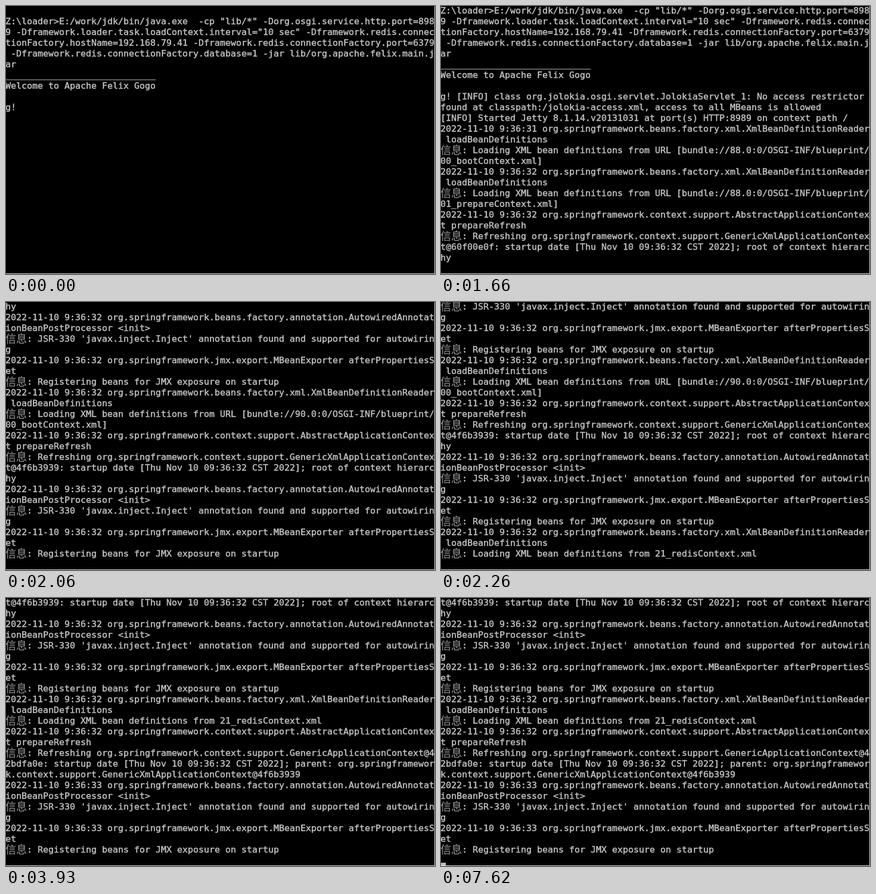
Animation, 800 px wide and 499 px high, one loop 8000 ms. Source, as an HTML page with a canvas:

```html
<!DOCTYPE html>
<html lang="en">
<head>
<meta charset="utf-8">
<title>Console</title>
<style>
html, body { margin: 0; width: 100%; height: 100%; overflow: hidden; background: #000; }
canvas { display: block; }
</style>
</head>
<body>
<canvas id="stage" width="800" height="499"></canvas>
<script>
const ctx = document.getElementById('stage').getContext('2d');
const LOOP = 8000, COLS = 80, ROWS = 24, CW = 10, RH = 20;
const MONO = '16.61px "DejaVu Sans Mono", monospace';
const CJK = '100 20px "Noto Sans CJK SC", "Noto Sans CJK", sans-serif';
const INK = '#c0c0c0', THIN_INK = '#989898', EDGE = '#f0f0f0';
const INFO = '信息';

const isWide = ch => ch > '\u2e80';

// Break a paragraph at the console width; wide characters take two columns.
function wrap(text) {
  const out = [];
  let line = '', col = 0;
  for (const ch of text) {
    const w = isWide(ch) ? 2 : 1;
    if (col + w > COLS) {
      out.push(line);
      line = '';
      col = 0;
    }
    line += ch;
    col += w;
  }
  return [...out, line];
}

const SPRING = 'org.springframework.';
const DATE = 'startup date [Thu Nov 10 09:36:32 CST 2022]; ';
const entry = (sec, method, msg) =>
  [`2022-11-10 9:36:${sec} ${SPRING}${method}`, `${INFO}: ${msg}`];

const load = (sec, from) => entry(sec,
  'beans.factory.xml.XmlBeanDefinitionReader loadBeanDefinitions',
  'Loading XML bean definitions from ' + from);
const url = (bundle, file) => `URL [bundle://${bundle}.0:0/OSGI-INF/blueprint/${file}.xml]`;
const refresh = (type, id, tail) => entry(32,
  'context.support.AbstractApplicationContext prepareRefresh',
  `Refreshing ${SPRING}context.support.${type}@${id}: ${DATE}${tail}`);
const wire = sec => [
  ...entry(sec, 'beans.factory.annotation.AutowiredAnnotationBeanPostProcessor <init>',
    "JSR-330 'javax.inject.Inject' annotation found and supported for autowiring"),
  ...entry(sec, 'jmx.export.MBeanExporter afterPropertiesSet',
    'Registering beans for JMX exposure on startup')
];
const ROOT = 'root of context hierarchy', XML = 'GenericXmlApplicationContext';

const log = [
  '',
  'Z:\\loader>E:/work/jdk/bin/java.exe  -cp "lib/*" -Dorg.osgi.service.http.port=8989 ' +
  '-Dframework.loader.task.loadContext.interval="10 sec" ' +
  '-Dframework.redis.connectionFactory.hostName=192.168.79.41 ' +
  '-Dframework.redis.connectionFactory.port=6379 ' +
  '-Dframework.redis.connectionFactory.database=1 -jar lib/org.apache.felix.main.jar',
  '_'.repeat(28),
  'Welcome to Apache Felix Gogo',
  '',
  'g! [INFO] class org.jolokia.osgi.servlet.JolokiaServlet_1: No access restrictor ' +
  'found at classpath:/jolokia-access.xml, access to all MBeans is allowed',
  '[INFO] Started Jetty 8.1.14.v20131031 at port(s) HTTP:8989 on context path /',
  ...load(31, url(88, '00_bootContext')),
  ...load(32, url(88, '01_prepareContext')),
  ...refresh(XML, '60f00e0f', ROOT),
  ...wire(32),
  ...load(32, url(90, '00_bootContext')),
  ...refresh(XML, '4f6b3939', ROOT),
  ...wire(32),
  ...load(32, '21_redisContext.xml'),
  ...refresh('GenericApplicationContext', '42bdfa0e',
    `parent: ${SPRING}context.support.${XML}@4f6b3939`),
  ...wire(33)
].flatMap(wrap);

// [time, number of console lines printed so far]
const PRINTED = [[0, 10], [380, 11], [580, 12], [1460, 16], [1660, 25],
  [1860, 32], [2060, 48], [2260, 51], [2460, 63]];
// [cursor on, cursor off]
const BLINKS = [[1260, 1460], [3360, 3930], [4450, 4970], [5500, 6030],
  [6550, 7100], [7620, LOOP]];

function drawLine(text, row) {
  const y = row * RH + 14;
  let x = -1;
  if (text.startsWith(INFO)) {
    ctx.font = CJK;
    ctx.fillStyle = THIN_INK;
    ctx.fillText(INFO, x, y + 2);
    text = text.slice(INFO.length);
    x += 4 * CW;
  }
  // A fine outline gives the Latin text its semi-bold weight.
  ctx.font = MONO;
  ctx.fillStyle = ctx.strokeStyle = INK;
  ctx.lineWidth = 0.5;
  ctx.fillText(text, x, y);
  ctx.strokeText(text, x, y);
}

function draw(t) {
  const count = PRINTED.filter(p => p[0] <= t).pop()[1];
  const top = Math.max(0, count - ROWS);

  ctx.fillStyle = '#000';
  ctx.fillRect(0, 0, 800, 499);
  for (let i = top; i < count; i++) {
    const prompt = count === 10 && i === 9;
    drawLine(prompt ? 'g!' : log[i], i - top);
  }
  if (BLINKS.some(([on, off]) => t >= on && t < off)) {
    ctx.fillStyle = INK;
    ctx.fillRect(0, (count - top) * RH + 13, 9, 5);
  }

  ctx.fillStyle = EDGE;
  ctx.fillRect(799, 0, 1, 499);
  ctx.fillRect(0, 498, 800, 1);
}

const start = performance.now();
function tick() {
  draw((performance.now() - start) % LOOP);
  requestAnimationFrame(tick);
}
tick();
</script>
</body>
</html>
```
